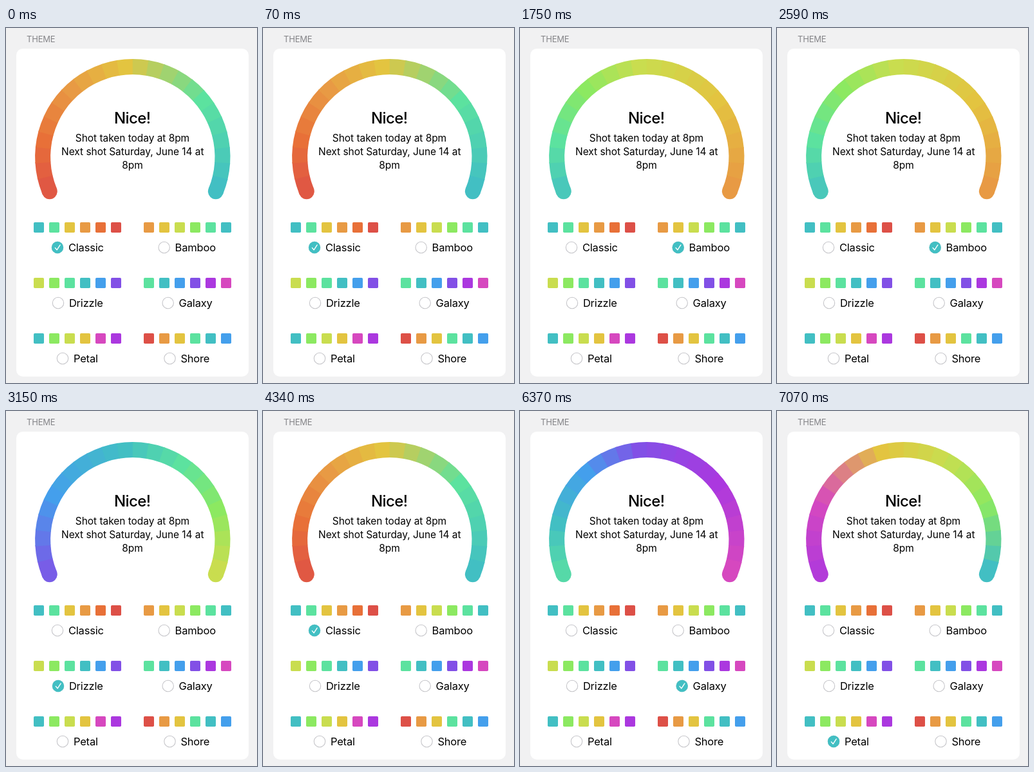
An HTML page that plays this animation: 390 px wide and 550 px high, repeating every 8 s.

```html
<!DOCTYPE html>
<html lang="en">
<head>
<meta charset="utf-8">
<title>Theme picker</title>
<style>
html, body { margin: 0; width: 100%; height: 100%; overflow: hidden; background: #f1f1f2; }
svg { display: block; width: 390px; height: 550px; font-family: Inter, "Liberation Sans", sans-serif; }
.head { font-size: 13px; letter-spacing: -.2px; fill: #858589; }
.title { font-size: 24px; font-weight: 500; letter-spacing: -.6px; }
.body { font-size: 15.5px; letter-spacing: -.05px; }
.label { font-size: 16.5px; letter-spacing: -.18px; }
.mid { text-anchor: middle; }
.radio { fill: #fff; stroke: #c6c6ca; stroke-width: 1.1; }
.tick { fill: none; stroke: #fff; stroke-width: 1.4; stroke-linecap: round; stroke-linejoin: round; }
.pick { visibility: hidden; animation: 8s step-end infinite; }
.Classic { animation-name: classic; }
.Bamboo { animation-name: bamboo; }
.Drizzle { animation-name: drizzle; }
.Galaxy { animation-name: galaxy; }
.Petal { animation-name: petal; }
@keyframes classic {
  0%, 54.25% { visibility: visible; }
  21.875%, 66.5%, 100% { visibility: hidden; }
}
@keyframes bamboo {
  0%, 39.375%, 100% { visibility: hidden; }
  21.875% { visibility: visible; }
}
@keyframes drizzle {
  0%, 54.25%, 100% { visibility: hidden; }
  39.375% { visibility: visible; }
}
@keyframes galaxy {
  0%, 88.375%, 100% { visibility: hidden; }
  66.5% { visibility: visible; }
}
@keyframes petal {
  0% { visibility: hidden; }
  88.375%, 100% { visibility: visible; }
}
</style>
</head>
<body>
<svg id="stage" viewBox="0 0 390 550">
  <rect width="390" height="550" fill="#f1f1f2"/>
  <rect x="16" y="32" width="361" height="508" rx="10" fill="#fff"/>
  <text class="head" x="32" y="22">THEME</text>
  <g id="gauge"></g>
  <text class="title mid" x="196.2" y="148">Nice!</text>
  <text class="body mid" x="196.5" y="176">Shot taken today at 8pm</text>
  <text class="body mid" x="196.8" y="197">Next shot Saturday, June 14 at</text>
  <text class="body mid" x="196.5" y="218">8pm</text>
  <g id="options"></g>
</svg>
<script>
const COLORS = {
  teal: '#42bfc3', mint: '#5ce29f', gold: '#e3c440', orange: '#e89a44',
  rust: '#e87038', red: '#dd5047', lime: '#c9dd4f', green: '#8ce961',
  blue: '#449fec', purple: '#8250e6', violet: '#ab38df', pink: '#d648bf'
};

// flip: gauge runs through the swatches backwards
// mid, at: index of the colour near the top of the gauge, and the parts before it
const THEMES = [
  { name: 'Classic', colors: 'teal mint gold orange rust red', dot: 80, flip: true, mid: 3, at: 12 },
  { name: 'Bamboo', colors: 'orange gold lime green mint teal', dot: 245.7, flip: true, mid: 3, at: 12 },
  { name: 'Drizzle', colors: 'lime green mint teal blue purple', dot: 81, flip: true, mid: 2, at: 12 },
  { name: 'Galaxy', colors: 'mint teal blue purple violet pink', dot: 251.7, mid: 3, at: 12 },
  { name: 'Petal', colors: 'teal green lime gold pink violet', dot: 88, flip: true, mid: 2, at: 11 },
  { name: 'Shore', colors: 'red orange gold mint teal blue', dot: 254.5 }
];

const CX = 196.8, CY = 199.7, R = 139.7, WIDTH = 24;
const START = 157.5, SWEEP = 225, PARTS = 24;

function add(parent, tag, attrs, text) {
  const el = document.createElementNS('http://www.w3.org/2000/svg', tag);
  for (const key in attrs) el.setAttribute(key, attrs[key]);
  if (text) el.textContent = text;
  parent.appendChild(el);
  return el;
}

function point(deg) {
  const a = deg * Math.PI / 180;
  return [CX + R * Math.cos(a), CY + R * Math.sin(a)];
}

function mix(from, to, t) {
  const channel = (hex, i) => parseInt(hex.substr(1 + 2 * i, 2), 16);
  const rgb = [0, 1, 2].map(i =>
    Math.round(channel(from, i) + (channel(to, i) - channel(from, i)) * t));
  return `rgb(${rgb})`;
}

function partColor(palette, theme, i) {
  const { mid, at } = theme;
  const n = i + 1;
  const pos = n <= at
    ? n / at * mid
    : mid + (n - at) / (PARTS - at) * (5 - mid);
  const k = Math.min(4, Math.floor(pos));
  return mix(palette[k], palette[k + 1], pos - k);
}

function drawGauge(parent, theme, palette) {
  const group = add(parent, 'g', { class: 'pick ' + theme.name });
  const stops = theme.flip ? [...palette].reverse() : palette;
  [0, PARTS - 1].forEach(i => {
    const [cx, cy] = point(START + (i ? SWEEP : 0));
    add(group, 'circle', { cx, cy, r: WIDTH / 2, fill: partColor(stops, theme, i) });
  });
  const step = SWEEP / PARTS;
  for (let i = 0; i < PARTS; i++) {
    const a = START + i * step;
    const overlap = i < PARTS - 1 ? .5 : 0;
    add(group, 'path', {
      d: `M${point(a)}A${R} ${R} 0 0 1 ${point(a + step + overlap)}`,
      fill: 'none', stroke: partColor(stops, theme, i), 'stroke-width': WIDTH
    });
  }
}

function drawOption(parent, theme, palette, index) {
  const left = index % 2 ? 214 : 43;
  const top = 301 + 86 * Math.floor(index / 2);
  const x = theme.dot, y = top + 39;
  palette.forEach((fill, i) =>
    add(parent, 'rect', { x: left + 24 * i, y: top, width: 16, height: 16, rx: 1.8, fill }));
  add(parent, 'circle', { class: 'radio', cx: x, cy: y, r: 8.7 });
  add(parent, 'text', { class: 'label', x: x + 16.9, y: y + 6 }, theme.name);
  if (theme.mid) {
    const mark = add(parent, 'g', { class: 'pick ' + theme.name });
    add(mark, 'circle', { cx: x, cy: y, r: 9.2, fill: COLORS.teal });
    add(mark, 'path', { class: 'tick', d: `M${x - 3.6} ${y + .6}l2.7 3.2l5 -7.6` });
  }
}

const gauge = document.getElementById('gauge');
const options = document.getElementById('options');
THEMES.forEach((theme, i) => {
  const palette = theme.colors.split(' ').map(key => COLORS[key]);
  if (theme.mid) drawGauge(gauge, theme, palette);
  drawOption(options, theme, palette, i);
});
</script>
</body>
</html>
```
